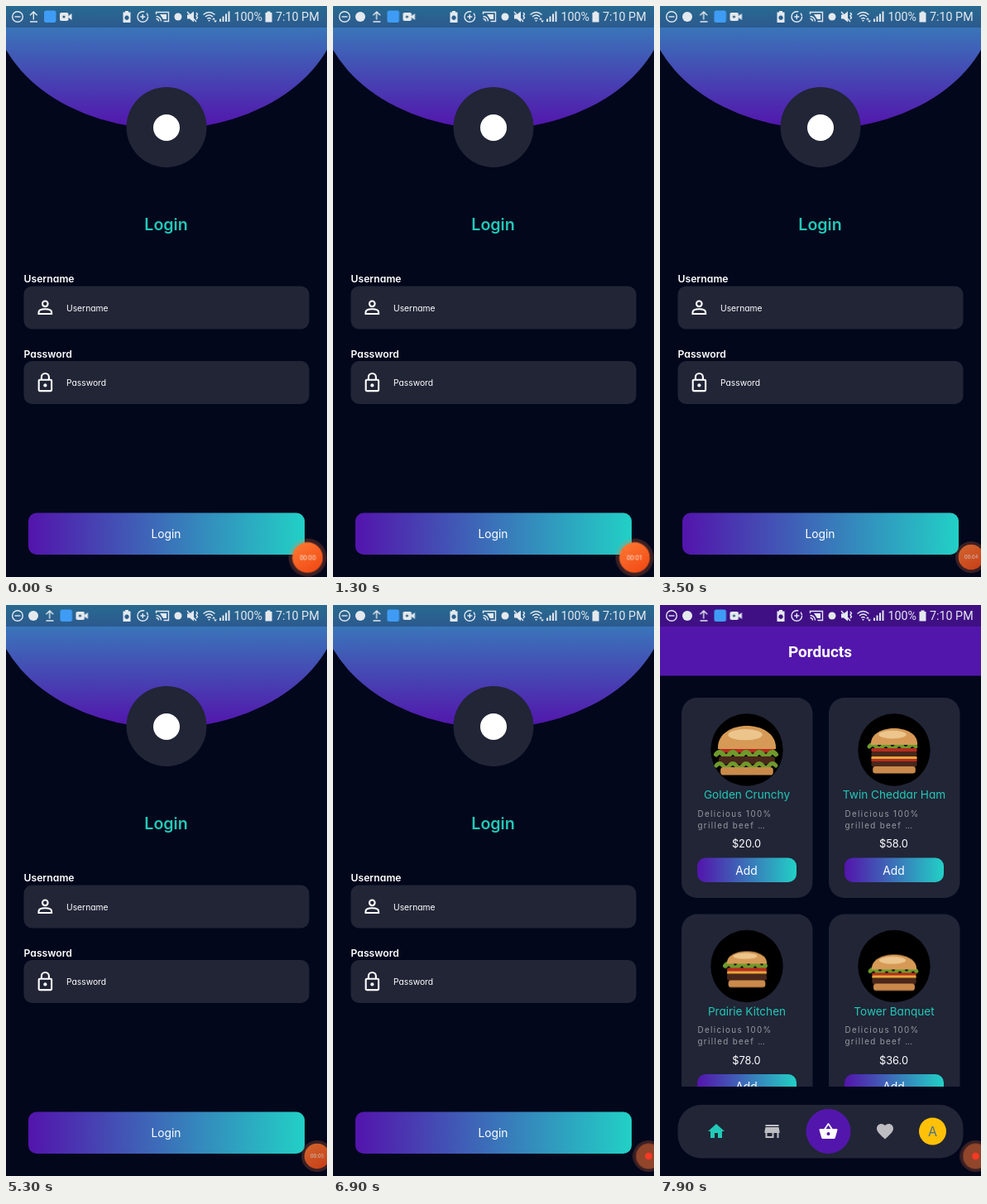
An HTML page that plays this animation: 388 px wide and 690 px high, repeating every 8000 ms.

```html
<!DOCTYPE html>
<html lang="en">
<head>
<meta charset="utf-8">
<title>Shop login</title>
<style>
html, body { margin: 0; width: 100%; height: 100%; overflow: hidden; background: #03071c; }
svg.stage { display: block; width: 100%; height: 100%; }
text { font-family: Inter, "Open Sans", sans-serif; font-feature-settings: "cv11"; fill: #fff; }
.mid { text-anchor: middle; }
.roboto { font-family: Roboto, sans-serif; }
.teal { fill: #22c9b8; }
.card { fill: #212536; }
.label { font-size: 12.2px; font-weight: 600; }
.hint { font-size: 10.3px; }
.desc { font-size: 9.8px; letter-spacing: 1.35px; fill: #9a9ba3; }
.line { fill: none; stroke: #fff; stroke-width: 2.1; }
.status { fill: #e4e9ee; stroke: none; }
.status .thin { fill: none; stroke: #e4e9ee; stroke-width: 1.4; }
.status text { fill: #e4e9ee; font-size: 14.3px; }

.login, .shop, .photo, .clock, .stopped, .digits { animation: 8s step-end infinite; }
.login { animation-name: leave; }
.shop { animation-name: enter; }
.photo { animation-name: load; }
.clock { animation-name: finish; }
.stopped { animation-name: stop; }
.digits { animation-name: tick; }
.shift { animation: shift 8s infinite; }
.newcomer { animation: grow 8s infinite; transform-origin: 33px 13px; }
.bubble { animation: dock 8s infinite; }
.dim { animation: dim 8s infinite; }

@keyframes leave { 0% { opacity: 1 } 88.6%, 100% { opacity: 0 } }
@keyframes enter { 0% { opacity: 0 } 88.6%, 100% { opacity: 1 } }
@keyframes load { 0% { opacity: 0 } 89.9%, 100% { opacity: 1 } }
@keyframes finish { 0% { opacity: 1 } 81.1%, 100% { opacity: 0 } }
@keyframes stop { 0% { opacity: 0 } 81.1%, 100% { opacity: 1 } }
@keyframes tick {
  0% { transform: translateY(0) }
  8.6% { transform: translateY(-10px) }
  19.8% { transform: translateY(-20px) }
  29.8% { transform: translateY(-30px) }
  43.6% { transform: translateY(-40px) }
  54.8% { transform: translateY(-50px) }
  69.8%, 100% { transform: translateY(-60px) }
}
@keyframes shift {
  0%, 1.25% { transform: translateX(0) }
  6.25%, 100% { transform: translateX(19.5px) }
}
@keyframes grow {
  0%, 1.25% { transform: scale(0) }
  6.25%, 100% { transform: scale(1) }
}
@keyframes dock {
  0%, 16.4% { transform: translate(364.5px, 666.5px) scale(1) }
  18.75%, 81.2% { transform: translate(376px, 666px) scale(.83) }
  86.1%, 100% { transform: translate(381.5px, 666px) scale(.83) }
}
@keyframes dim {
  0%, 16.4% { opacity: 1 }
  18.75%, 100% { opacity: .78 }
}
</style>
</head>
<body>
<svg class="stage" viewBox="0 0 388 690">
  <defs>
    <linearGradient id="sweep"><stop stop-color="#5314ac"/><stop offset="1" stop-color="#22d0c6"/></linearGradient>
    <linearGradient id="sky" gradientUnits="userSpaceOnUse" x1="0" y1="-88" x2="0" y2="148">
      <stop stop-color="#22d0c6"/><stop offset="1" stop-color="#5314ac"/>
    </linearGradient>
    <linearGradient id="ember" x2="0.6" y2="1"><stop stop-color="#ff7c35"/><stop offset="1" stop-color="#f24d16"/></linearGradient>
    <clipPath id="list"><rect y="86" width="388" height="496"/></clipPath>
  </defs>

  <rect width="388" height="690" fill="#03071c"/>

  <g class="login">
    <ellipse cx="194" cy="-11.5" rx="212" ry="160" fill="url(#sky)"/>
    <circle class="card" cx="194" cy="146.5" r="48.5"/>
    <circle cx="194" cy="147" r="16" fill="#fff"/>
    <text class="mid teal" x="193.5" y="271" font-size="19.6" font-weight="600">Login</text>

    <text class="label" x="21.5" y="334">Username</text>
    <rect class="card" x="21.5" y="338.5" width="345" height="52" rx="10"/>
    <g class="line">
      <circle cx="47.3" cy="359.8" r="3.3"/>
      <path d="M39.5 372v-1.8c0-5.2 15.6-5.2 15.6 0v1.8z"/>
    </g>
    <text class="hint" x="73" y="368.7">Username</text>

    <text class="label" x="21.5" y="425">Password</text>
    <rect class="card" x="21.5" y="429" width="345" height="52" rx="10"/>
    <g class="line">
      <rect x="39.7" y="451.7" width="15.4" height="13.4" rx="1"/>
      <path d="M42.9 451v-2.5a4.5 4.5 0 0 1 9 0v2.5"/>
    </g>
    <circle cx="47.4" cy="458.4" r="2.1" fill="#fff"/>
    <text class="hint" x="73" y="459.2">Password</text>

    <rect x="27" y="612.5" width="334" height="50.5" rx="10" fill="url(#sweep)"/>
    <text class="mid" x="193.5" y="642.5" font-size="13.8">Login</text>
  </g>

  <g class="shop">
    <rect width="388" height="690" fill="#03071c"/>
    <rect width="388" height="85.5" fill="#5316ac"/>
    <text class="mid roboto" x="193.5" y="63" font-size="19" font-weight="700">Porducts</text>
    <g id="cards" clip-path="url(#list)"></g>

    <rect class="card" x="21.5" y="604" width="345" height="64.5" rx="28"/>
    <path class="teal" transform="translate(56 624)" d="M10 20v-6h4v6h5v-8h3L12 3 2 12h3v8z"/>
    <path fill="#bdbdc2" transform="translate(123.5 624)" d="M20 4H4v2h16zM21 14v-2l-1-5H4l-1 5v2h1v6h10v-6h4v6h2v-6zM12 18H6v-4h6z"/>
    <circle cx="203.5" cy="636" r="27" fill="#5316ac"/>
    <path fill="#fff" fill-rule="evenodd" transform="translate(191.5 624)" d="M17.2 9l-4.4-6.6q-.8-.8-1.6 0L6.8 9H2q-1 0-1 1.3l2.6 9.2Q4 21 5.5 21h13q1.5 0 1.9-1.5L23 10.3Q23 9 22 9zM9 9l3-4.4L15 9zM12 17a2 2 0 1 1 0-4 2 2 0 0 1 0 4z"/>
    <path fill="#bdbdc2" transform="translate(260 624)" d="M12 21.4l-1.5-1.3C5.4 15.4 2 12.3 2 8.5 2 5.4 4.4 3 7.5 3c1.7 0 3.4.8 4.5 2.1C13.1 3.8 14.8 3 16.5 3 19.6 3 22 5.4 22 8.5c0 3.8-3.4 6.9-8.5 11.6z"/>
    <circle cx="329.5" cy="636" r="16.5" fill="#ffc107"/>
    <text class="mid" x="329.5" y="641.5" font-size="16" style="fill:#4c6f94">A</text>
  </g>

  <g class="status">
    <rect width="388" height="26" fill="#000" opacity=".23"/>
    <circle class="thin" cx="14" cy="13" r="6.3"/>
    <path class="thin" d="M10.5 13h7"/>
    <circle class="newcomer" cx="33" cy="13" r="6"/>
    <g class="shift">
      <path class="thin" d="M33.3 16.5V7m-4.3 4.3L33.3 7l4.3 4.3M29 19h9"/>
      <rect x="46" y="5.5" width="14.5" height="14.5" rx="2.5" fill="#3f9cf5"/>
      <rect x="65" y="8" width="10.5" height="10" rx="2"/>
      <path d="M75 12.5l4.5-3.5v8l-4.5-3.5z"/>
      <circle cx="70" cy="13" r="1.6" fill="#35617e"/>
    </g>
    <path fill-rule="evenodd" d="M141.5 7.5h2.5V6h4v1.5h2.5V20h-9zM146 11.5a2.7 2.7 0 1 0 .1 0z"/>
    <circle class="thin" cx="165.3" cy="13" r="6.3" stroke-dasharray="31 3 4 2"/>
    <path class="thin" d="M162.3 13h6m-3-3v6"/>
    <path class="thin" d="M181.5 10V7.5h15v11h-6M181.5 12.5a6 6 0 0 1 6 6m-6-3a3 3 0 0 1 3 3"/>
    <path d="M186 10h8v6h-4z"/>
    <circle cx="208" cy="13" r="4.5"/>
    <path d="M219 10.5h3l5-4v13l-5-4h-3z"/>
    <path class="thin" d="M219 7l11 12M230 8l1.5 2-1.5 2 1.5 2-1.5 2"/>
    <path class="thin" d="M238.5 10.5q7-6 14 0M241 13q4.5-4 9 0M243.3 15.5q2.200-2 4.400 0"/>
    <path d="M244 17h3l-1.5 2zM251 14l2 2.5h-4zM253 20l-2-2.5h4z"/>
    <path d="M258 15.5h2V19h-2zM261.5 12.5h2V19h-2zM265 9.5h2V19h-2zM268.5 6.5h2V19h-2z"/>
    <text class="roboto" x="275.5" y="18.3">100%</text>
    <path d="M313.5 8h2V6.5h4V8h2v11.5h-8z"/>
    <text class="roboto" x="326" y="18.3">7:10 PM</text>
  </g>

  <g class="bubble">
    <circle r="23" fill="#ff7a45" opacity=".22"/>
    <g class="clock"><g class="dim">
      <circle r="18.5" fill="url(#ember)"/>
      <g font-size="6.9">
        <text x="-9.6" y="2.5">00:0</text>
        <svg x="5.2" y="-4" width="7" height="9">
          <g class="digits" id="digits"></g>
        </svg>
      </g>
    </g></g>
    <g class="stopped">
      <circle r="18.5" fill="#91452b"/>
      <circle r="5.2" fill="#f93a25"/>
    </g>
  </g>
</svg>

<script>
const GREEN = '#6f9a2c', RED = '#b62d20', MEAT = '#4a271b', CHEESE = '#e5a53b', BUN = '#c98a4b';

// Stacks layers [colour, height] under a domed bun; green ones are wavy.
function burger({ w, dome, top, layers }) {
  const half = w / 2, base = top + dome, bend = top - dome / 3;
  let y = base;
  const parts = layers.map(([color, h]) => {
    const at = y;
    y += h;
    if (color === GREEN) {
      const waves = 't8 0'.repeat(Math.floor(w / 8) - 1);
      return `<path d="M${-half} ${at + h / 2}q4 -5 8 0${waves}" fill="none" stroke="${color}" stroke-width="${h + 1}" stroke-linecap="round"/>`;
    }
    const wide = w * (color === BUN ? 0.86 : 0.92);
    return `<rect x="${-wide / 2}" y="${at}" width="${wide}" height="${h + 0.5}" rx="${h / 2.5}" fill="${color}"/>`;
  });
  return parts.join('') +
    `<path d="M${-half + 2} ${base}C${-half} ${bend} ${half} ${bend} ${half - 2} ${base}z" fill="#d69a56"/>` +
    `<ellipse cx="-2" cy="${top + dome * 0.38}" rx="${w * 0.28}" ry="${dome * 0.24}" fill="#ecc58d"/>`;
}

const products = [
  { name: 'Golden Crunchy', price: '$20.0', w: 74, dome: 28, top: -29,
    layers: [[RED, 4], [GREEN, 5], [MEAT, 9], [GREEN, 4], [BUN, 9]] },
  { name: 'Twin Cheddar Ham', price: '$58.0', w: 60, dome: 20, top: -26,
    layers: [[GREEN, 4], [RED, 4], [MEAT, 6], [CHEESE, 3], [RED, 3], [MEAT, 6], [BUN, 8]] },
  { name: 'Prairie Kitchen', price: '$78.0', w: 52, dome: 15, top: -18,
    layers: [[GREEN, 5], [RED, 4], [CHEESE, 3], [MEAT, 8], [BUN, 8]] },
  { name: 'Tower Banquet', price: '$36.0', w: 58, dome: 18, top: -14,
    layers: [[GREEN, 4], [RED, 3], [CHEESE, 3], [MEAT, 7], [BUN, 8]] }
];

document.getElementById('cards').innerHTML = products.map((p, i) => `
  <g transform="translate(${26 + 178 * (i % 2)} ${112 + 261.5 * Math.floor(i / 2)})">
    <rect class="card" width="158.5" height="242" rx="19"/>
    <circle cx="79" cy="63" r="43.7"/>
    <g class="photo" style="animation-delay:${i * 100}ms"><g transform="translate(79 63)">${burger(p)}</g></g>
    <text class="mid teal" x="79" y="122" font-size="13.6">${p.name}</text>
    <text class="desc" x="19.5" y="143.5">Delicious 100%</text>
    <text class="desc" x="19.5" y="157.5">grilled beef …</text>
    <text class="mid" x="78.5" y="181.3" font-size="12.8">${p.price}</text>
    <rect x="19" y="193.5" width="120" height="29.5" rx="10" fill="url(#sweep)"/>
    <text class="mid" x="78.5" y="213.5" font-size="13.8">Add</text>
  </g>`).join('');

document.getElementById('digits').innerHTML =
  Array.from({ length: 7 }, (_, n) => `<text x="0.5" y="${6.5 + n * 10}">${n}</text>`).join('');
</script>
</body>
</html>
```
